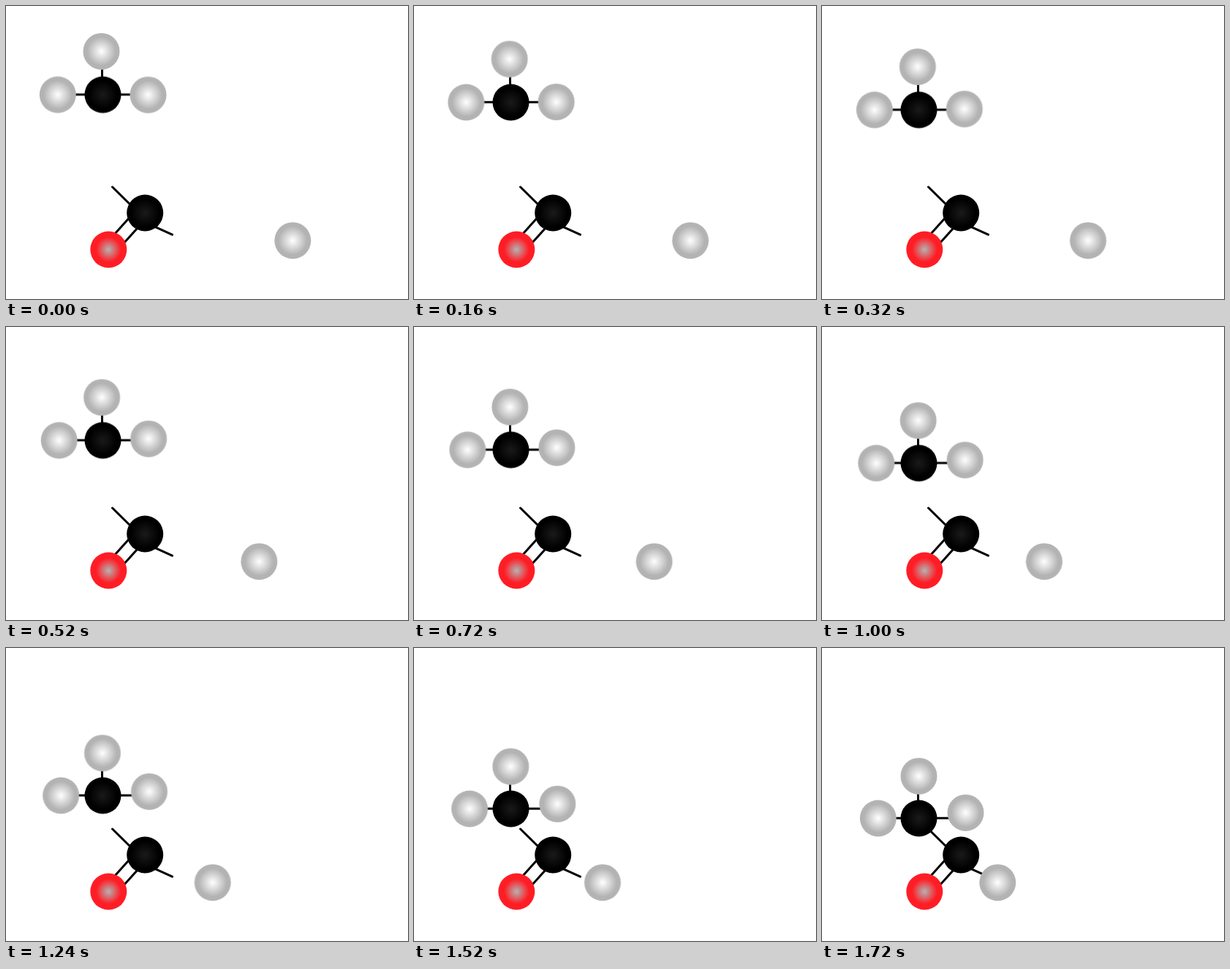
These frames come from a looping animation (550 px wide and 400 px high, 2160 ms). An HTML page:

```html
<!DOCTYPE html>
<html lang="en">
<head>
<meta charset="utf-8">
<title>Molecule assembly</title>
<style>
  html, body { margin: 0; width: 100%; height: 100%; overflow: hidden; background: #fff; }
  svg { display: block; width: 550px; height: 400px; }
  .bond { fill: none; stroke: #000; stroke-width: 3; stroke-linecap: round; }

  /* Each part starts displaced by --dx, --dy and steps to its resting place. */
  .moving { animation: join 2160ms -1ms infinite; }
  @keyframes join {
    0% { transform: translate(var(--dx), var(--dy)); animation-timing-function: steps(43, end); }
    79.62963%, 100% { transform: translate(0, 0); }
  }
  .carbon   { --dx: 0px;    --dy: -111.4px; }
  .left     { --dx: -6px;   --dy: -111.4px; }
  .top      { --dx: -2px;   --dy: -113px; }
  .right    { --dx: -2px;   --dy: -103.6px; }
  .incoming { --dx: 152px;  --dy: 0px; }
</style>
</head>
<body>
<svg viewBox="0 0 550 400">
  <defs>
    <radialGradient id="gray">
      <stop offset="0" stop-color="#fff"/>
      <stop offset=".78" stop-color="#b3b3b3"/>
    </radialGradient>
    <radialGradient id="black">
      <stop offset="0" stop-color="#1a1a1a"/>
      <stop offset=".78" stop-color="#000"/>
    </radialGradient>
    <radialGradient id="red">
      <stop offset="0" stop-color="#b3b3b3"/>
      <stop offset=".68" stop-color="#ff1d25"/>
    </radialGradient>
    <circle id="atom" r="25"/>
  </defs>

  <path class="bond" d="M145.5 247L172 273M202 300.7L227.5 312.2M171 286.5L148 312M180 303L161 324"/>
  <path class="bond moving carbon" d="M90 232.3H173M131.5 232.3V190"/>

  <use href="#atom" x="190.2" y="282.5" fill="url(#black)"/>
  <use href="#atom" x="140.3" y="332.5" fill="url(#red)"/>

  <g class="moving carbon"><use href="#atom" x="132.5" y="232.5" fill="url(#black)"/></g>
  <g fill="url(#gray)">
    <g class="moving left"><use href="#atom" x="76.8" y="232.5"/></g>
    <g class="moving top"><use href="#atom" x="132.5" y="174.9"/></g>
    <g class="moving right"><use href="#atom" x="196.5" y="224.9"/></g>
    <g class="moving incoming"><use href="#atom" x="240.3" y="320.2"/></g>
  </g>
</svg>
</body>
</html>
```
